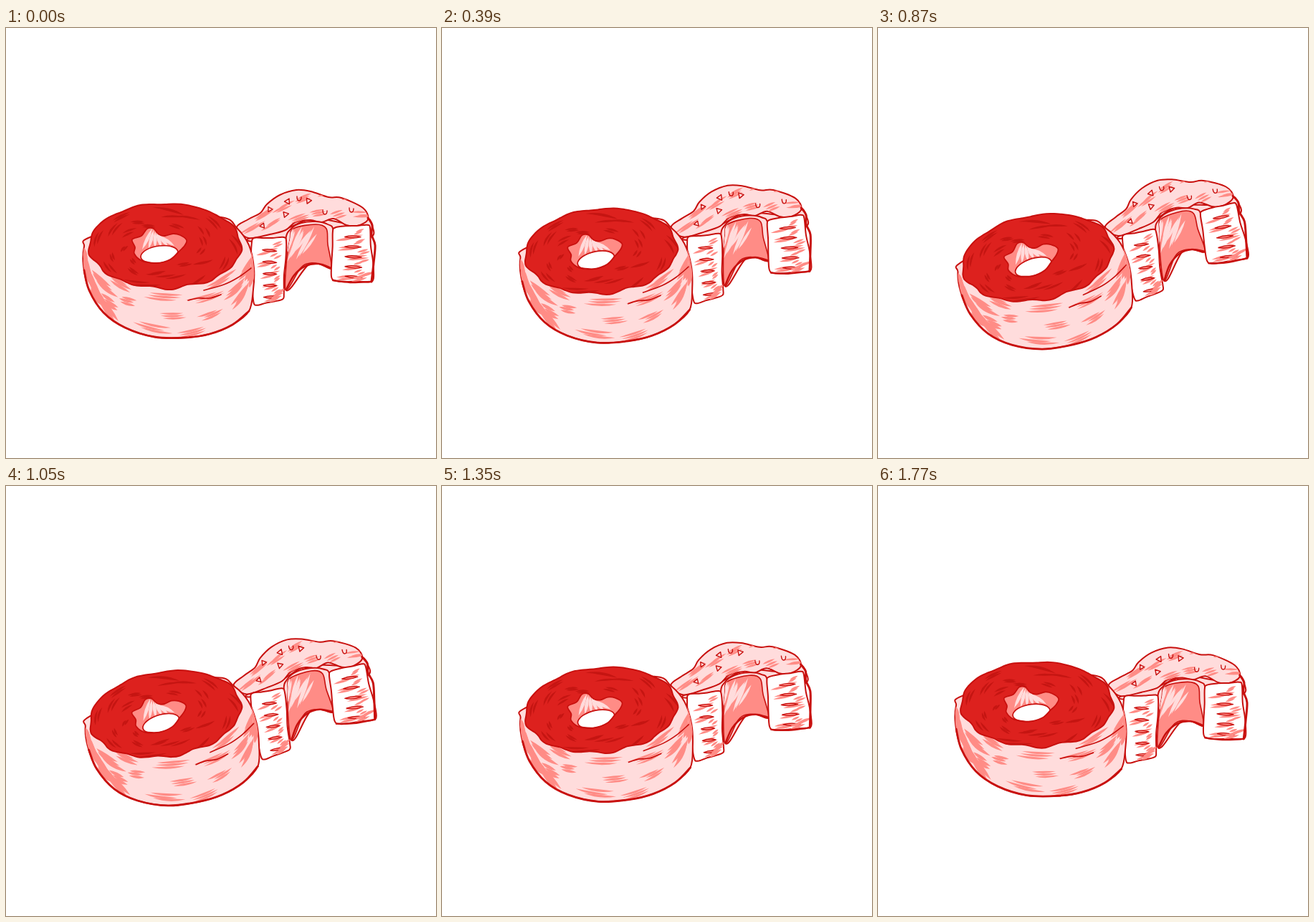
Write an HTML page that moves like this. It is 600 px wide and 600 px high and loops after 1.8 s.

```html
<!DOCTYPE html>
<html lang="en">
<head>
<meta charset="utf-8">
<title>Rocking donuts</title>
<style>
  html, body { margin: 0; height: 100%; overflow: hidden; background: #fff; }
  svg { display: block; width: 100vw; height: 100vh; }
  path { stroke-linejoin: round; stroke-linecap: round; }
</style>
</head>
<body>
<svg viewBox="0 0 600 600"><defs></defs><g id="art"></g></svg>
<script>
const NS = 'http://www.w3.org/2000/svg';
const LINE = '#c8100e', RED = '#dd211e', DARK = '#c51512', PALE = '#ffdcdc', PINK = '#ff8c86', WHITE = '#fff';
const { sin, cos, PI, hypot } = Math;
const art = document.getElementById('art'), defs = document.querySelector('defs');

let seed = 7;
const rnd = (lo, hi) => {
  seed = seed * 16807 % 2147483647;
  return lo + (hi - lo) * seed / 2147483647;
};
const mix = (p, q, t) => [p[0] + (q[0] - p[0]) * t, p[1] + (q[1] - p[1]) * t];
const points = s => s.split(' ').map(p => p.split(',').map(Number));

// Smooth path through the points
function curve(p, closed = true) {
  const n = p.length;
  const at = i => closed ? p[(i + n) % n] : p[Math.max(0, Math.min(n - 1, i))];
  let d = 'M' + p[0];
  for (let i = 0; i < (closed ? n : n - 1); i++) {
    const [a, b, c, e] = [at(i - 1), at(i), at(i + 1), at(i + 2)];
    d += `C${[0, 1].map(k => b[k] + (c[k] - a[k]) / 6)} ${[0, 1].map(k => c[k] - (e[k] - b[k]) / 6)} ${c}`;
  }
  return d + (closed ? 'Z' : '');
}

function add(parent, tag, attrs) {
  const el = document.createElementNS(NS, tag);
  for (const k in attrs) el.setAttribute(k, attrs[k]);
  return parent.appendChild(el);
}
function draw(d, fill, stroke = 'none', width = 2, clip) {
  add(art, 'path', { d, fill, stroke, 'stroke-width': width, ...(clip && { 'clip-path': `url(#${clip})` }) });
}
// Outlined shape that can also clip the marks drawn on it
function shape(id, pts, fill, width) {
  const d = curve(pts);
  add(add(defs, 'clipPath', { id }), 'path', { d });
  draw(d, fill, LINE, width);
}
const line = (pts, width) => draw(curve(pts, false), 'none', LINE, width);

// Tapered stroke from p to q, bending through m
function leaf(p, q, fat, fill, clip, m = mix(p, q, .5), stroke) {
  const len = hypot(q[0] - p[0], q[1] - p[1]) || 1;
  const nx = (p[1] - q[1]) / len * fat, ny = (q[0] - p[0]) / len * fat;
  const c = mix(mix(p, q, .5), m, 2);
  draw(`M${p}Q${c[0] + nx},${c[1] + ny} ${q}Q${c[0] - nx},${c[1] - ny} ${p}Z`, fill, stroke, 1.3, clip);
}
// Staggered leaves on a surface at(a, s), forming a ragged patch
function shard(at, a, s, da, ds, fat, fill, clip, n = 3) {
  for (let i = 0; i < n; i++) {
    const a0 = a + da * rnd(-.3, .3), s0 = s + (i - (n - 1) / 2) * fat / at.height;
    leaf(at(a0, s0), at(a0 + da, s0 + ds), fat, fill, clip, at(a0 + da / 2, s0 + ds / 2));
  }
}
const surface = (height, at) => Object.assign(at, { height });

// Back donut: crust, then topping
draw(curve(points('338,294 386,282 428,266 480,273 502,264 511,276 508,292 455,295 398,294 350,298')), PALE, LINE);
shape('topping', points('322,278 338,267 355,258 364,246 382,233 405,226 425,228 450,236 468,237 498,251 505,267 490,276 475,275 457,266 440,271 425,268 404,271 390,282 368,288 338,293'), PALE);
const topping = surface(38, (u, s) => {
  const q = sin(2.2 * u);
  return [330 + 170 * u, 275 - 48 * q + s * (17 + 22 * q)];
});
for (let i = 0; i < 11; i++) {
  shard(topping, i / 11, i % 2 ? rnd(.1, .35) : rnd(.7, .95), rnd(.1, .17), rnd(-.25, -.05), 3, PINK, 'topping');
}

// Sprinkles
points('368,253 393,242 422,241 358,276 390,260').forEach(([x, y], i) => {
  const r = i % 3 ? 4.5 : 4;
  const corner = k => `${x + r * cos(k * PI / 1.5 + i)},${y + r * sin(k * PI / 1.5 + i)}`;
  draw(`M${corner(0)}L${corner(1)} ${corner(2)}Z`, PALE, LINE, 1.4);
});
points('409,238 445,257 482,254').forEach(([x, y]) =>
  draw(`M${x - 3},${y - 3}q0,6 3,6t3,-5`, 'none', LINE, 1.4));

// Hollow between the cut faces
draw(curve(points('390,298 398,280 412,272 432,270 449,274 457,284 457,334 425,328 391,366')), PALE, LINE);
shape('hollow', points('396,296 401,280 432,274 447,280 449,302 454,334 440,330 425,328 411,335 391,366 391,330'), PINK, 1.6);
const hollow = surface(60, (u, s) => [394 + 56 * u, 278 + 60 * s]);
for (let i = 0; i < 6; i++) {
  shard(hollow, .15 + .1 * i, .02 + .1 * (i % 2), rnd(-.4, -.2), rnd(.45, .75), 4, PALE, 'hollow', 2);
}
line(points('391,365 402,345 418,332 436,329 454,335'), 2.6);

// Cut face: uneven box with a column of slits
function face(id, corners, tilt) {
  const c = points(corners), edge = [];
  c.forEach((p, i) => [.07, .36, .64, .93].forEach(t => {
    const [x, y] = mix(p, c[(i + 1) % 4], t);
    edge.push([x + rnd(-1.5, 1.5), y + rnd(-1, 1)]);
  }));
  shape(id, edge, WHITE);
  const at = surface(80, (u, v) => mix(mix(c[0], c[1], u), mix(c[3], c[2], u), v));
  for (let v = .2; v < 1; v += .18) {
    shard(at, .22, v + .03, rnd(.45, .6), -.03, 3.5, PINK, id, 2);
    shard(at, .6, v - .06, rnd(.2, .3), -.05, 3, PINK, id, 2);
    leaf(at(.32, v - tilt), at(.74, v + tilt), 3.2, PINK, id, undefined, LINE);
  }
  shard(at, .55, .96, .4, -.08, 4, PINK, id);
}
face('left', '342,294 390,291 389,378 346,388', .02);
face('right', '456,278 508,274 512,354 455,353', .01);
line(points('505,265 511,275 510,288 515,303 513,328 510,354'), 3);
line(points('510,354 480,355 456,352'), 2.4);

// Front donut: body
shape('body', points('117,292 109,305 108,332 116,366 136,397 166,418 207,431 250,432 284,427 316,414 339,395 345,365 346,335 339,303 322,279 300,264 210,262'), PALE);
const side = surface(65, (a, s) => [227 - 118 * cos(a), 305 + 58 * sin(a) + s * (25 + 47 * sin(a))]);
for (let i = 0; i < 20; i++) {
  const a = .05 + i * PI / 20, ends = cos(a) ** 2;
  shard(side, a, (i * .38 + .12) % 1, rnd(.2, .4), rnd(-.05, .15) * cos(a), 3 + 3 * ends, PINK, 'body', 3);
}
for (let i = 0; i < 4; i++) shard(side, .1 + i * .16, .3 + i * .12, .3, .25, 6, PINK, 'body');
line([[254, 380], [268, 377], [284, 377], [300, 372]], 1.7);
line([[276, 366], [304, 358], [324, 348], [342, 335]], 1.6);
line(points('109,338 116,366 136,397 166,418 207,431 250,432 284,427 316,414 339,395'), 2.8);

// Front donut: icing with a wavy rim
const rim = Array.from({ length: 60 }, (_, i) => {
  const a = i * PI / 30, front = Math.max(0, sin(a));
  const r = 1 + .012 * sin(9 * a) + (.008 + .022 * front) * sin(13 * a + 1);
  return [222 + 106 * r * cos(a), 304 + 59 * r * sin(a)];
});
shape('icing', rim, RED);
const ring = surface(40, (a, s) => [212 + 10 * s + (42 + 64 * s) * cos(a), 305 - s + (25 + 34 * s) * sin(a)]);
for (let i = 0; i < 26; i++) {
  shard(ring, i * PI / 13, [.25, .78, .52][i % 3] + rnd(-.08, .08), rnd(.25, .45), rnd(-.18, .18), 3, DARK, 'icing', 2);
}

// Front donut: hole
const hole = points('176,295 189,290 197,280 206,280 213,288 222,290 233,287 243,289 252,296 249,304 240,313 229,323 210,328 190,325 179,315 180,306');
shape('hole', hole, PINK, 1.8);
for (let i = 0; i < 6; i++) leaf([204 + 2 * i, 280 + 2 * i], [190 + 9 * i, 309 - i], 5, PALE, 'hole');
const opening = Array.from({ length: 16 }, (_, i) => {
  const a = i * PI / 8;
  return [214 + 26 * cos(a), 316 + 12 * sin(a) - 3 * cos(a)];
});
draw(curve(opening), WHITE, LINE, 1.7, 'hole');
line(hole.slice(10, 14), 1.8);

// Steady rocking, ten degrees out and back
const LOOP = 1800, STEP = 30, start = performance.now();
function frame(now) {
  const t = Math.floor(Math.max(0, now - start) % LOOP / STEP) * STEP;
  const angle = -10 * (1 - Math.abs(2 * t / LOOP - 1));
  art.setAttribute('transform', `rotate(${angle} 319 308)`);
  requestAnimationFrame(frame);
}
frame(start);
</script>
</body>
</html>
```
